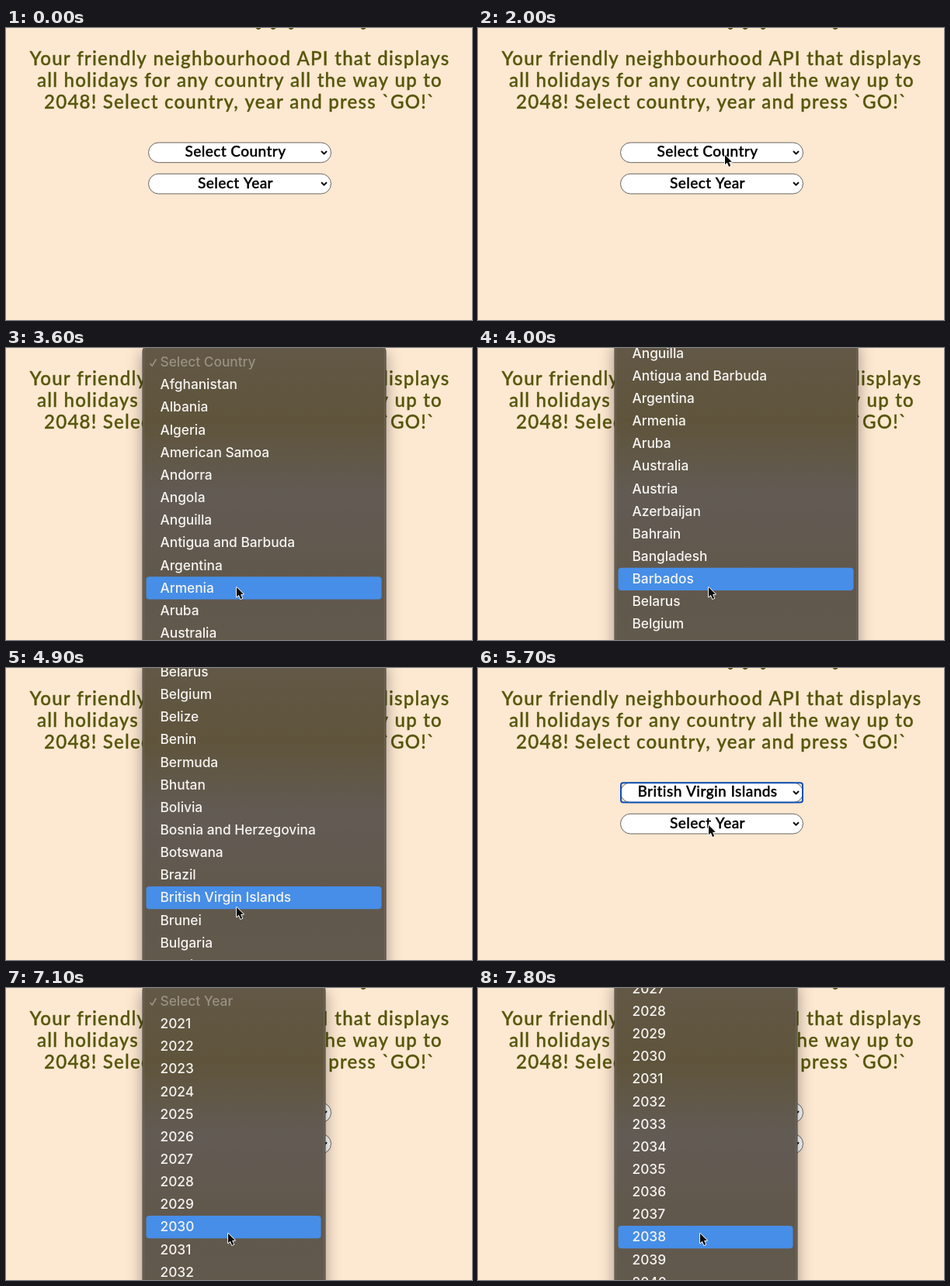
Animation, 600 px wide and 377 px high, one loop 8000 ms. Source, as an HTML page with a canvas:

```html
<!DOCTYPE html>
<html lang="en">
<head>
<meta charset="utf-8">
<title>Holiday picker</title>
<style>
html, body { margin: 0; width: 100%; height: 100%; overflow: hidden; background: #fde8d1; }
canvas { display: block; width: 600px; height: 377px; }
</style>
</head>
<body>
<canvas id="stage"></canvas>
<script>
const W = 600, H = 377, LOOP = 8000, STEP = 100, PITCH = 29.15;
const TITLE_FONT = 'Lato, "Open Sans", sans-serif';
const MENU_FONT = 'Inter, Roboto, sans-serif';
const OLIVE = '#55560a', MUTED = '#989184';
const canvas = document.getElementById('stage');
const ctx = canvas.getContext('2d');
const ratio = window.devicePixelRatio || 1;
canvas.width = W * ratio;
canvas.height = H * ratio;

const intro = [
  'Your friendly neighbourhood API that displays',
  'all holidays for any country all the way up to',
  '2048! Select country, year and press `GO!`'
];
const countries = ('Select Country,Afghanistan,Albania,Algeria,American Samoa,Andorra,Angola,' +
  'Anguilla,Antigua and Barbuda,Argentina,Armenia,Aruba,Australia,Austria,Azerbaijan,' +
  'Bahrain,Bangladesh,Barbados,Belarus,Belgium,Belize,Benin,Bermuda,Bhutan,Bolivia,' +
  'Bosnia and Herzegovina,Botswana,Brazil,British Virgin Islands,Brunei,Bulgaria,' +
  'Burkina Faso,Burundi,Cambodia').split(',');
const years = ['Select Year', ...Array.from({ length: 28 }, (_, i) => String(2021 + i))];

// Fast start, soft stop
function settle(p) {
  return 1 - (1 - Math.min(1, Math.max(0, p))) ** 1.5;
}

// Each move: [begin, end, ...destination]
function follow(start, moves, t) {
  return moves.reduce((pos, [begin, end, ...goal]) => {
    const p = settle((t - begin) / (end - begin));
    return pos.map((v, i) => v + (goal[i] - v) * p);
  }, start);
}

const pointerAt = t => follow([620, 2], [
  [1200, 2000, 318, 164], [2600, 3200, 297, 309], [5300, 5700, 297, 203], [6300, 6800, 286, 317]
], t);
const countryRow = t => follow([162], [[3400, 4200, -249], [4600, 4900, -520]], t)[0];
const yearRow = t => follow([203], [[6900, 7400, -145], [7700, 7800, -203.5]], t)[0];

function box(x, y, w, h, r) {
  ctx.beginPath();
  ctx.roundRect(x, y, w, h, r);
}

function polyline(points) {
  ctx.beginPath();
  points.forEach(p => ctx.lineTo(...p));
}

function stroke(color, width) {
  ctx.strokeStyle = color;
  ctx.lineWidth = width;
  ctx.stroke();
}

// Centred text, slightly thickened
function heading(text, x, y, size, color, spacing) {
  ctx.font = `500 ${size}px ${TITLE_FONT}`;
  ctx.textAlign = 'center';
  ctx.letterSpacing = spacing + 'px';
  ctx.fillStyle = ctx.strokeStyle = color;
  ctx.lineWidth = 0.4;
  ctx.lineJoin = 'round';
  ctx.fillText(text, x, y);
  ctx.strokeText(text, x, y);
}

function drawPage() {
  ctx.fillStyle = '#fde8d1';
  ctx.fillRect(0, 0, W, H);

  // Descenders of the heading just above the view
  for (const x of [325, 344, 367, 460]) {
    ctx.beginPath();
    ctx.arc(x, -2, 3, 0.2, Math.PI - 0.6);
    stroke(OLIVE, 2);
  }
  intro.forEach((s, i) => heading(s, 301, 48 + i * 28.2, 24, OLIVE, 1.25));
}

function drawSelect(y, text, focused) {
  box(183.5, y, 235, 25.7, 12.8);
  ctx.fillStyle = '#fff';
  ctx.fill();
  stroke('#696562', 1);
  heading(text, 295.5, y + 18.4, 19, '#000', 0.45);
  polyline([[406, y + 11], [409.5, y + 14.5], [413, y + 11]]);
  stroke('#111', 2);
  if (focused) {
    box(184, y + 0.3, 234, 25.2, 3);
    stroke('#0f50b4', 2);
  }
}

function menuFill() {
  const g = ctx.createLinearGradient(0, 0, 0, H);
  ['#625846', '#5f543b', '#625b54', '#61584d', '#62594d']
    .forEach((c, i, all) => g.addColorStop(i / (all.length - 1), c));
  return g;
}

function drawMenu(items, width, row0, tipY, alpha = 1) {
  const left = 176, top = Math.max(row0 - 20, -12), height = H + 40 - top;
  ctx.save();
  ctx.globalAlpha = alpha;
  box(left, top, width, height, 6);
  ctx.shadowColor = 'rgba(0,0,0,.38)';
  ctx.shadowBlur = 20 * ratio;
  ctx.shadowOffsetY = 7 * ratio;
  ctx.fillStyle = menuFill();
  ctx.fill();
  ctx.shadowColor = 'transparent';
  stroke('#403a32', 1);
  box(left + 1, top + 1, width - 2, height, 5);
  stroke('rgba(255,255,255,.17)', 1);

  ctx.font = `500 17.3px ${MENU_FONT}`;
  ctx.textAlign = 'left';
  ctx.letterSpacing = '0px';
  const active = Math.round((tipY - row0 - 0.5) / PITCH);
  items.forEach((item, i) => {
    const y = row0 + i * PITCH;
    if (i > 0 && i === active) {
      box(180.5, y - 14.2, width - 10, 29.2, 4);
      ctx.fillStyle = '#468ee7';
      ctx.fill();
    }
    ctx.fillStyle = i ? '#f6f4f1' : MUTED;
    ctx.fillText(item, 198.5, y + 6.2);
  });
  polyline([[185.5, row0 + 2], [188.2, row0 + 5.2], [193.3, row0 - 3.5]]);
  stroke(MUTED, 1.7);
  ctx.restore();
}

function drawPointer(x, y) {
  ctx.save();
  ctx.translate(x, y);
  ctx.scale(0.88, 0.88);
  polyline([[0, 0], [0, 14], [3.2, 11.2], [5.7, 17], [8.2, 15.9], [5.8, 10.3], [10, 10]]);
  ctx.closePath();
  ctx.lineJoin = 'round';
  stroke('#fff', 2);
  ctx.fillStyle = '#0a0a0a';
  ctx.fill();
  ctx.restore();
}

function draw(t) {
  ctx.setTransform(ratio, 0, 0, ratio, 0, 0);
  const [x, y] = pointerAt(t);
  const chosen = t >= 5200;
  drawPage();
  drawSelect(148, countries[chosen ? 28 : 0], chosen && t < 5800);
  drawSelect(188.3, years[0], false);
  if (t >= 2200 && t < 5400) drawMenu(countries, 313, countryRow(t), y, t < 5300 ? 1 : 0.45);
  if (t >= 5800) drawMenu(years, 235, yearRow(t), y);
  if (t >= 1300) drawPointer(x, y);
}

function tick() {
  const t = performance.now() % LOOP;
  draw(Math.floor(t / STEP) * STEP);
  requestAnimationFrame(tick);
}
tick();
</script>
</body>
</html>
```
